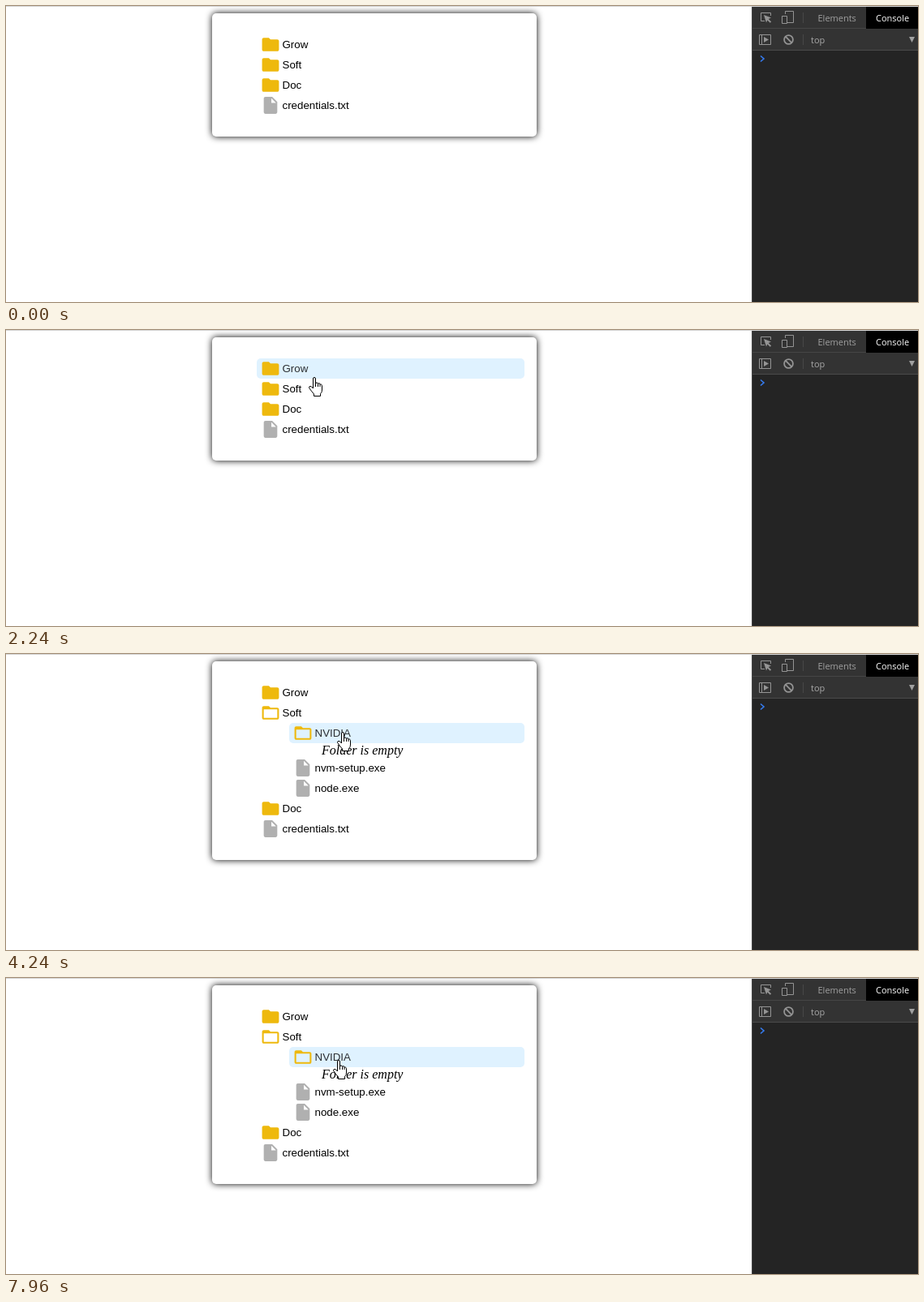
An HTML page with a canvas that plays this animation: 1124x365 px, repeating every 8 s.

```html
<!DOCTYPE html>
<html lang="en">
<head>
<meta charset="utf-8">
<title>File tree</title>
<style>
  html, body { margin: 0; width: 100%; height: 100%; overflow: hidden; background: #fff; }
  canvas { display: block; }
</style>
</head>
<body>
<canvas id="stage" width="1124" height="365"></canvas>
<script>
const ctx = document.getElementById('stage').getContext('2d');
const LOOP = 8000;
const SOFT_OPENS = 3090, NVIDIA_OPENS = 4240;
const ROW_H = 25, NOTE_H = 18, NOTE = 'Folder is empty';
const UI_FONT = '11px "Open Sans", "Noto Sans", sans-serif';
const ROW_FONT = '13.333px "Liberation Sans", Arial, sans-serif';
const NOTE_FONT = 'italic 16px "Liberation Serif", "Times New Roman", serif';

const ICONS = {
  folder: new Path2D('M10 4H4c-1.1 0-1.99.9-1.99 2L2 18c0 1.1.9 2 2 2h16c1.1 0 2-.9 2-2V8c0-1.1-.9-2-2-2h-8l-2-2z'),
  open: new Path2D('M20 6h-8l-2-2H4c-1.1 0-1.99.9-1.99 2L2 18c0 1.1.9 2 2 2h16c1.1 0 2-.9 2-2V8c0-1.1-.9-2-2-2zm0 12H4V8h16v10z'),
  file: new Path2D('M6 2c-1.1 0-1.99.9-1.99 2L4 20c0 1.1.89 2 1.99 2H18c1.1 0 2-.9 2-2V8l-6-6H6zm7 7V3.5L18.5 9H13z')
};
const ARROW = new Path2D('M.5.5V16.5L4.2 13 6.6 18.6 8.8 17.6 6.4 12.2H11.5Z');
const HAND = new Path2D('M.5 14V2Q.5.5 2 .5T3.5 2V8Q3.5 7 5 7T6.5 8.5Q6.5 7.7 8 7.8T9 9.5Q9.3 8.8 10.3 9T11.5 10.8V16Q11.5 19 9.5 20.5V23.5H1.5V21Q-2 17-4.3 13.5-4.8 11.5-3 11.3-1.5 11.3 .5 14Z');
const KNUCKLES = new Path2D('M3.5 8V12M6.5 8.5V12M9 9.5V12');
const IBEAM = new Path2D('M-.5-5.5H1.5L2.5-4.5 3.5-5.5H5.5M2.5-4.5V7.5M-.5 8.5H1.5L2.5 7.5 3.5 8.5H5.5');

// Pointer samples: time, x, y, button held, selected letters
const POINTER = [
  [150, 710, 221], [230, 650, 190], [300, 590, 160], [380, 535, 137],
  [460, 480, 118], [530, 440, 107], [610, 410, 104], [690, 395, 108],
  [770, 386, 116], [840, 380, 123], [920, 378, 127], [990, 377, 122],
  [1540, 377, 122, 1], [1770, 377, 122],
  [2240, 378, 58], [2320, 376, 62], [2400, 374, 67], [2470, 373, 70], [2550, 372, 72],
  [2860, 372, 72, 1], [3010, 372, 72],
  [3550, 377, 76], [3630, 388, 83], [3710, 400, 90], [3780, 409, 94], [3860, 413, 96],
  [4010, 413, 96, 1], [4240, 413, 96],
  [4400, 415, 102], [4480, 417, 109], [4550, 419, 113],
  [5020, 419, 113, 1], [5250, 425, 114, 1, 1], [5330, 431, 116, 1, 2], [5410, 434, 116, 0, 2],
  [5930, 434, 116, 1, 2], [6110, 434, 116], [7960, 408, 101]
];

function rect(x, y, w, h, color) {
  ctx.fillStyle = color;
  ctx.fillRect(x, y, w, h);
}

function rounded(x, y, w, h, color) {
  ctx.fillStyle = color;
  ctx.beginPath();
  ctx.roundRect(x, y, w, h, 5);
  ctx.fill();
}

function text(str, x, y, font, color) {
  ctx.font = font;
  ctx.fillStyle = color;
  ctx.fillText(str, x, y);
}

function stroke(d, color, width = 1) {
  ctx.strokeStyle = color;
  ctx.lineWidth = width;
  ctx.stroke(typeof d === 'string' ? new Path2D(d) : d);
}

function layout(t) {
  const soft = t >= SOFT_OPENS, nvidia = t >= NVIDIA_OPENS;
  const rows = [];
  let y = 35, noteY = null;
  const add = (name, icon, depth = 0) => {
    rows.push({ name, icon, y, x: 309 + depth * 40 });
    y += ROW_H;
  };
  add('Grow', 'folder');
  add('Soft', soft ? 'open' : 'folder');
  if (soft) {
    add('NVIDIA', nvidia ? 'open' : 'folder', 1);
    if (nvidia) {
      noteY = y;
      y += NOTE_H;
    }
    add('nvm-setup.exe', 'file', 1);
    add('node.exe', 'file', 1);
  }
  add('Doc', 'folder');
  add('credentials.txt', 'file');
  return { rows, noteY, bottom: y + 26 };
}

function drawCard(bottom) {
  ctx.save();
  ctx.shadowColor = '#000';
  ctx.shadowBlur = 8;
  rounded(254, 9, 400, bottom - 9, '#fff');
  ctx.restore();
}

function drawRow({ name, icon, x, y }, hovered) {
  if (hovered) rounded(x, y, 639 - x, ROW_H, '#dff2ff');
  ctx.save();
  ctx.translate(x + 4.5, y);
  ctx.scale(25 / 24, 25 / 24);
  ctx.fillStyle = icon === 'file' ? (hovered ? '#a8acaf' : '#b0b0b0') : '#eeb90d';
  ctx.fill(ICONS[icon]);
  ctx.restore();
  text(name, x + 31.5, y + 17, ROW_FONT, hovered ? '#2d3033' : '#000');
}

function drawNote(y, letters) {
  const x = 389;
  text(NOTE, x, y + 14, NOTE_FONT, '#000');
  if (!letters) return;
  const from = ctx.measureText('Fold').width;
  const width = ctx.measureText(NOTE.slice(0, 4 + letters)).width - from;
  ctx.save();
  ctx.beginPath();
  ctx.rect(x + from, y, width, NOTE_H);
  ctx.clip();
  rect(x + from, y, width, NOTE_H, '#3390ff');
  text(NOTE, x, y + 14, NOTE_FONT, '#fff');
  ctx.restore();
}

function drawTools() {
  rect(919, 1, 205, 364, '#242424');
  rect(919, 1, 205, 53, '#333');
  rect(919, 27, 205, 1, '#454545');
  rect(919, 54, 205, 1, '#4a4a4a');
  rect(919, 1, 1, 364, '#484848');
  rect(1060, 1, 64, 27, '#000');
  rect(982, 8, 1, 13, '#484848');
  rect(982, 35, 1, 13, '#484848');
  const gray = '#949494';

  // Element picker
  stroke('M935 18.5H930.5V8.5H942.5V12', gray);
  ctx.fillStyle = gray;
  ctx.fill(new Path2D('M934 11L943 14.5 939.8 16 943.2 19.4 941.7 20.8 938.4 17.4 937 20.5Z'));
  // Device toggle
  stroke('M960.5 10V6.5H970.5V20.5H963M956.5 12.5H962.5V21.5H956.5Z', gray);
  // Console sidebar
  stroke('M928.5 35.5H942.5V47.5H928.5ZM931.5 35.5V47.5', gray);
  ctx.fill(new Path2D('M934 38L940 41.5 934 45Z'));
  // Clear console
  ctx.beginPath();
  ctx.arc(964.5, 41.5, 5.4, 0, Math.PI * 2);
  stroke(new Path2D('M960.7 37.7L968.3 45.3'), gray, 1.8);
  ctx.stroke();

  text('Elements', 1000.5, 19, UI_FONT, '#a0a0a0');
  text('Console', 1072, 19, UI_FONT, '#fff');
  text('top', 992, 46, UI_FONT, '#a8a8a8');
  ctx.fillStyle = '#a0a0a0';
  ctx.fill(new Path2D('M1113 38H1120L1116.5 45Z'));
  stroke('M930 61.5L934 65 930 68.5', '#367cf1', 1.6);
}

function drawPointer(x, y, held, shape) {
  if (held) {
    ctx.fillStyle = 'rgba(255,255,0,.47)';
    ctx.beginPath();
    ctx.arc(x, y, 12, 0, Math.PI * 2);
    ctx.fill();
  }
  ctx.save();
  ctx.translate(x, y);
  if (shape !== IBEAM) {
    ctx.fillStyle = '#fff';
    ctx.fill(shape);
  }
  stroke(shape, '#000');
  if (shape === HAND) stroke(KNUCKLES, '#000');
  ctx.restore();
}

function draw(t) {
  rect(0, 0, 1124, 365, '#fff');
  rect(0, 0, 1124, 1, '#d6d6d6');
  const { rows, noteY, bottom } = layout(t);
  const sample = POINTER.findLast(p => p[0] <= t);
  const [, px, py, held, letters] = sample || [];
  const hover = rows.find(r => px >= r.x && px < 639 && py >= r.y && py < r.y + ROW_H);
  const onNote = noteY !== null && py >= noteY && py < noteY + NOTE_H;

  drawCard(bottom);
  rows.forEach(r => drawRow(r, r === hover));
  if (noteY !== null) drawNote(noteY, letters);
  drawTools();
  if (sample) drawPointer(px, py, held, hover ? HAND : onNote ? IBEAM : ARROW);
}

function tick() {
  draw(performance.now() % LOOP);
  requestAnimationFrame(tick);
}
tick();
</script>
</body>
</html>
```
